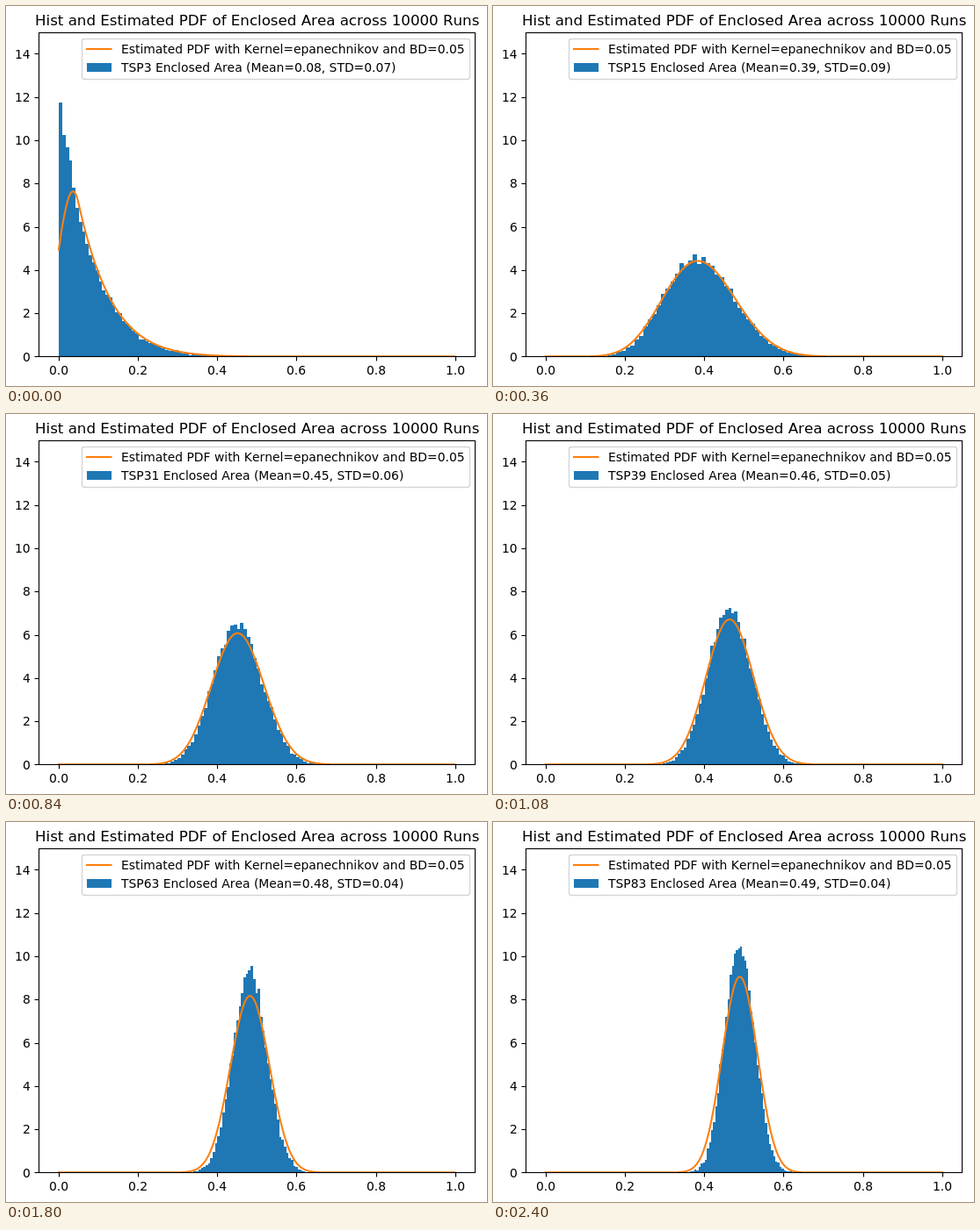
Recreate the animation shown at these times as an HTML page with a canvas. Size 547 by 433 pixels, loop 2.43 s.

```html
<!DOCTYPE html>
<html lang="en">
<head>
<meta charset="utf-8">
<title>Enclosed area histogram</title>
<style>
  html, body { margin: 0; width: 100%; height: 100%; overflow: hidden; background: #fff; }
  canvas { display: block; }
</style>
</head>
<body>
<canvas id="chart" width="547" height="433"></canvas>
<script>
const ctx = document.getElementById('chart').getContext('2d');
const BLUE = '#1f77b4', ORANGE = '#ff7f0e';
const STEP_MS = 30, STEPS = 81, FIRST_N = 3;
const RUNS = 10000, BINS = 50, BANDWIDTH = 0.05, CELLS = 2000, NOISE = 0.6;
const LEFT = 37.5, RIGHT = 533.5, TOP = 30.5, BOTTOM = 399.5;
const px = x => 59.93 + x * 450.9;
const py = y => 399.4 - y * 24.64;
const snap = v => Math.round(v) + 0.5;

function seededRandom(seed) {
  return () => {
    seed = (seed + 0x6D2B79F5) | 0;
    let r = Math.imul(seed ^ (seed >>> 15), 1 | seed);
    r = (r + Math.imul(r ^ (r >>> 7), 61 | r)) ^ r;
    return ((r ^ (r >>> 14)) >>> 0) / 4294967296;
  };
}

// Mean and spread of the enclosed area of a tour through n points.
function areaStats(n) {
  return {
    mean: 0.512 - 1.85 / (n + 3.73 / n),
    std: 0.341 / Math.sqrt(n + 185 / (n * n))
  };
}

// Beta density with the given moments, sampled at cell centres of [0, 1].
function areaDensity({ mean, std }) {
  const k = mean * (1 - mean) / (std * std) - 1;
  const a = mean * k - 1, b = (1 - mean) * k - 1;
  const peak = Math.min(0.99, Math.max(0.001, a / (a + b)));
  const logAt = x => a * Math.log(x) + b * Math.log(1 - x);
  const top = logAt(peak);
  const values = Array.from({ length: CELLS }, (_, i) => Math.exp(logAt((i + 0.5) / CELLS) - top));
  const total = values.reduce((s, v) => s + v, 0) / CELLS;
  return values.map(v => v / total);
}

function cumulative(density) {
  const sums = [0];
  density.forEach((v, i) => sums.push(sums[i] + v / CELLS));
  return sums;
}

function cumulativeAt(sums, x) {
  const pos = Math.min(CELLS - 1e-6, x * CELLS), i = Math.floor(pos);
  return sums[i] + (sums[i + 1] - sums[i]) * (pos - i);
}

function kernelEstimate(density, x) {
  const reach = BANDWIDTH * CELLS, centre = x * CELLS - 0.5;
  const from = Math.max(0, Math.ceil(centre - reach));
  const to = Math.min(CELLS - 1, Math.floor(centre + reach));
  let sum = 0;
  for (let i = from; i <= to; i++) sum += density[i] * (1 - ((i - centre) / reach) ** 2);
  return 0.75 * sum / reach;
}

function drawBars(n, density) {
  const random = seededRandom(n * 7919);
  const gauss = () => Math.sqrt(-2 * Math.log(1 - random())) * Math.cos(2 * Math.PI * random());
  const sums = cumulative(density);
  const low = sums.findIndex(s => s > 0.0002) / CELLS;
  const high = Math.min(sums.findIndex(s => s > 0.9998) / CELLS, 0.42 + 0.06 * (n - FIRST_N));
  const width = (high - low) / BINS;
  ctx.fillStyle = BLUE;
  for (let i = 0; i < BINS; i++) {
    const x = low + i * width;
    const expected = RUNS * (cumulativeAt(sums, x + width) - cumulativeAt(sums, x));
    const count = Math.max(0, Math.round(expected + NOISE * gauss() * Math.sqrt(expected)));
    const x0 = Math.round(px(x)), x1 = Math.round(px(x + width));
    const y = Math.round(py(count / RUNS / width));
    ctx.fillRect(x0, y, x1 - x0, 400 - y);
  }
}

function drawCurve(density) {
  ctx.beginPath();
  for (let i = 0; i <= 500; i++) ctx.lineTo(px(i / 500), py(kernelEstimate(density, i / 500)));
  ctx.strokeStyle = ORANGE;
  ctx.lineWidth = 2.08;
  ctx.lineJoin = 'round';
  ctx.lineCap = 'square';
  ctx.stroke();
}

function line(x0, y0, x1, y1) {
  ctx.beginPath();
  ctx.moveTo(x0, y0);
  ctx.lineTo(x1, y1);
  ctx.stroke();
}

// Text starts on a whole pixel; align is the share of its width left of x.
function text(str, x, y, align = 0, size = 13.89) {
  ctx.font = `${size}px "DejaVu Sans", sans-serif`;
  ctx.fontKerning = 'none';
  ctx.fillStyle = '#000';
  ctx.fillText(str, Math.round(x - align * ctx.measureText(str).width), Math.round(y));
}

function drawAxes() {
  ctx.strokeStyle = '#000';
  ctx.lineWidth = 1.11;
  ctx.lineCap = 'butt';
  for (let i = 0; i <= 5; i++) {
    const x = px(i / 5);
    line(snap(x), BOTTOM, snap(x), BOTTOM + 5);
    text((i / 5).toFixed(1), x, 420, 0.5);
  }
  for (let v = 0; v <= 14; v += 2) {
    const y = py(v);
    line(LEFT - 5, snap(y), LEFT, snap(y));
    text(String(v), 27.7, y + 5.2, 1);
  }
  ctx.strokeRect(LEFT, TOP, RIGHT - LEFT, BOTTOM - TOP);
  text('Hist and Estimated PDF of Enclosed Area across 10000 Runs', 285.4, 22, 0.5, 16.67);
}

function drawLegend(n, { mean, std }) {
  ctx.beginPath();
  ctx.roundRect(86.5, 37.5, 441, 46, 2.8);
  ctx.fillStyle = 'rgba(255,255,255,0.8)';
  ctx.fill();
  ctx.strokeStyle = 'rgba(204,204,204,0.8)';
  ctx.lineWidth = 1.39;
  ctx.stroke();
  ctx.strokeStyle = ORANGE;
  ctx.lineWidth = 2.08;
  ctx.lineCap = 'square';
  line(92, 49, 119.5, 49);
  ctx.fillStyle = BLUE;
  ctx.fillRect(92, 65, 28, 10);
  text(`Estimated PDF with Kernel=epanechnikov and BD=${BANDWIDTH}`, 131, 54);
  text(`TSP${n} Enclosed Area (Mean=${mean.toFixed(2)}, STD=${std.toFixed(2)})`, 131, 75);
}

function draw(n) {
  const stats = areaStats(n), density = areaDensity(stats);
  ctx.fillStyle = '#fff';
  ctx.fillRect(0, 0, 547, 433);
  ctx.save();
  ctx.beginPath();
  ctx.rect(LEFT, TOP, RIGHT - LEFT, BOTTOM - TOP);
  ctx.clip();
  drawBars(n, density);
  drawCurve(density);
  ctx.restore();
  drawAxes();
  drawLegend(n, stats);
}

let shown = 0, startTime;
function tick(now) {
  startTime ??= now;
  const n = FIRST_N + Math.floor(Math.max(0, now - startTime) / STEP_MS) % STEPS;
  if (n !== shown) draw(shown = n);
  requestAnimationFrame(tick);
}
draw(shown = FIRST_N);
requestAnimationFrame(tick);
</script>
</body>
</html>
```
